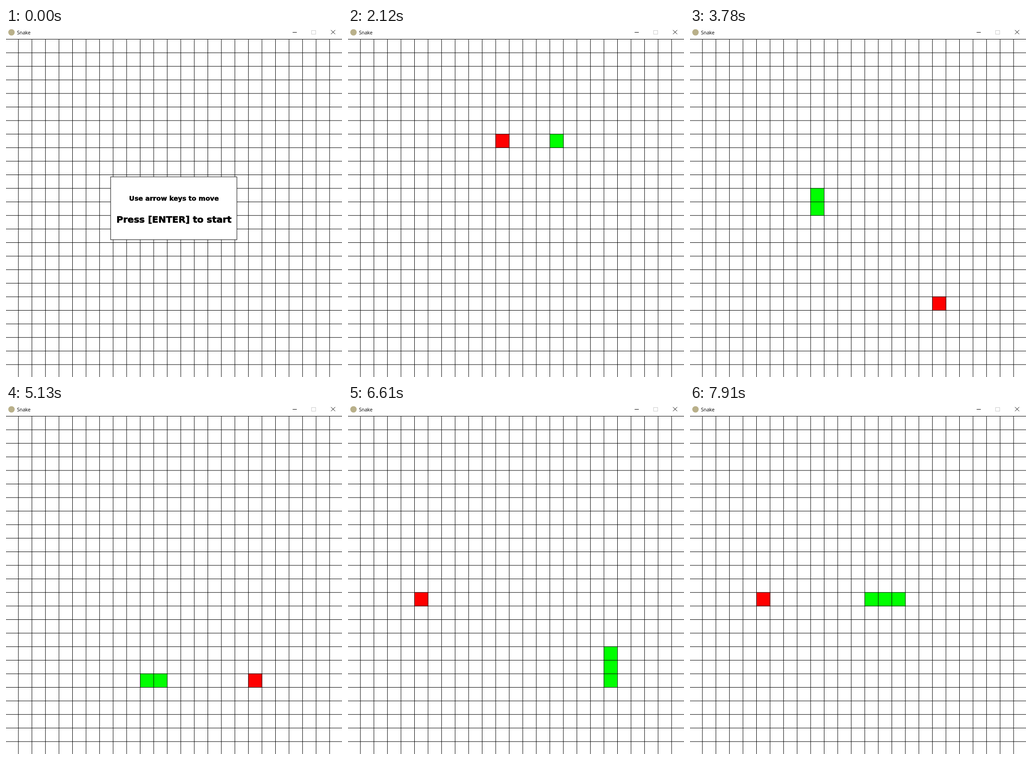
These frames come from a looping animation (735x762 px, 8000 ms). An HTML page with a canvas:

```html
<!DOCTYPE html>
<html lang="en">
<head>
<meta charset="utf-8">
<title>Snake</title>
<style>
html, body { margin: 0; width: 100%; height: 100%; overflow: hidden; background: #fff; }
canvas { display: block; }
</style>
</head>
<body>
<canvas id="stage" width="735" height="762"></canvas>
<script>
const ctx = document.getElementById('stage').getContext('2d');
const W = 735, H = 762, LOOP = 8000;
const LEFT = 26.6, TOP = 24, PITCH = 29.6, LINE = 0.99;

const lineX = i => LEFT + PITCH * i;
const lineY = i => TOP + PITCH * i;

// Head route through its corners, one cell per tick
const corners = [[12, 12], [15, 12], [15, 7], [8, 7], [8, 19], [18, 19], [18, 13], [12, 13]];
const route = [corners[0]];
for (const [tx, ty] of corners.slice(1)) {
  let [x, y] = route[route.length - 1];
  while (x !== tx || y !== ty) {
    x += Math.sign(tx - x);
    y += Math.sign(ty - y);
    route.push([x, y]);
  }
}

const foods = [[10, 7], [17, 19], [4, 13]];
const eatTicks = foods.map(([fx, fy]) => route.findIndex(([x, y]) => x === fx && y === fy));

// Pace: [first tick, its time, ms per tick]; negative ticks mean the game has not begun
const paces = [[0, 740, 147.5], [4, 1330, 151.9], [36, 6190, 132]];
function tickAt(t) {
  const [tick, from, step] = paces.findLast(p => t >= p[1]) || [-1, 0, LOOP];
  return Math.min(route.length - 1, tick + Math.floor((t - from) / step));
}

function rect(color, x, y, w, h) {
  ctx.fillStyle = color;
  ctx.fillRect(x, y, w, h);
}

function fillCell(color, [x, y]) {
  rect(color, lineX(x), lineY(y), PITCH + LINE, PITCH + LINE);
}

function stroke(color, ...points) {
  ctx.strokeStyle = color;
  ctx.lineWidth = 1;
  ctx.beginPath();
  points.forEach(([x, y]) => ctx.lineTo(x, y));
  ctx.stroke();
}

function heading(text, y, size) {
  ctx.font = `bold ${size}px "DejaVu Sans", sans-serif`;
  ctx.textAlign = 'center';
  ctx.fillStyle = ctx.strokeStyle = '#000';
  ctx.lineWidth = size * 0.035;
  ctx.fillText(text, 367.5, y);
  ctx.strokeText(text, 367.5, y);
}

function drawGrid() {
  for (let x = LEFT; x < W; x += PITCH) rect('#000', x, TOP, LINE, H - TOP);
  for (let y = TOP; y < H; y += PITCH) rect('#000', 0, y, W, LINE);
}

function drawTitleBar() {
  ctx.fillStyle = '#b9b08a';
  ctx.beginPath();
  ctx.arc(12, 9.5, 7, 0, Math.PI * 2);
  ctx.fill();
  ctx.font = '10.7px "Open Sans", "Noto Sans", sans-serif';
  ctx.textAlign = 'left';
  ctx.fillStyle = '#000';
  ctx.fillText('Snake', 24, 14);
  stroke('#000', [627, 9.5], [636, 9.5]);
  ctx.strokeStyle = '#ccc';
  ctx.strokeRect(668.5, 5.5, 9, 8);
  stroke('#000', [711, 4.5], [720, 13.5]);
  stroke('#000', [720, 4.5], [711, 13.5]);
}

function drawDialog() {
  rect('#000', 228.4, 324.5, 277.2, 138.2);
  rect('#fff', 229.4, 325.5, 275.2, 136.2);
  heading('Use arrow keys to move', 377, 14.5);
  heading('Press [ENTER] to start', 425, 20);
}

function draw(t) {
  rect('#fff', 0, 0, W, H);
  const tick = tickAt(t);
  if (tick >= 0) {
    const eaten = eatTicks.filter(e => e >= 0 && e <= tick).length;
    fillCell('#f00', foods[eaten]);
    route.slice(Math.max(0, tick - eaten), tick + 1).forEach(cell => fillCell('#0f0', cell));
  }
  drawGrid();
  drawTitleBar();
  if (tick < 0) drawDialog();
}

const start = performance.now();
function frame() {
  draw((performance.now() - start) % LOOP);
  requestAnimationFrame(frame);
}
frame();
</script>
</body>
</html>
```
